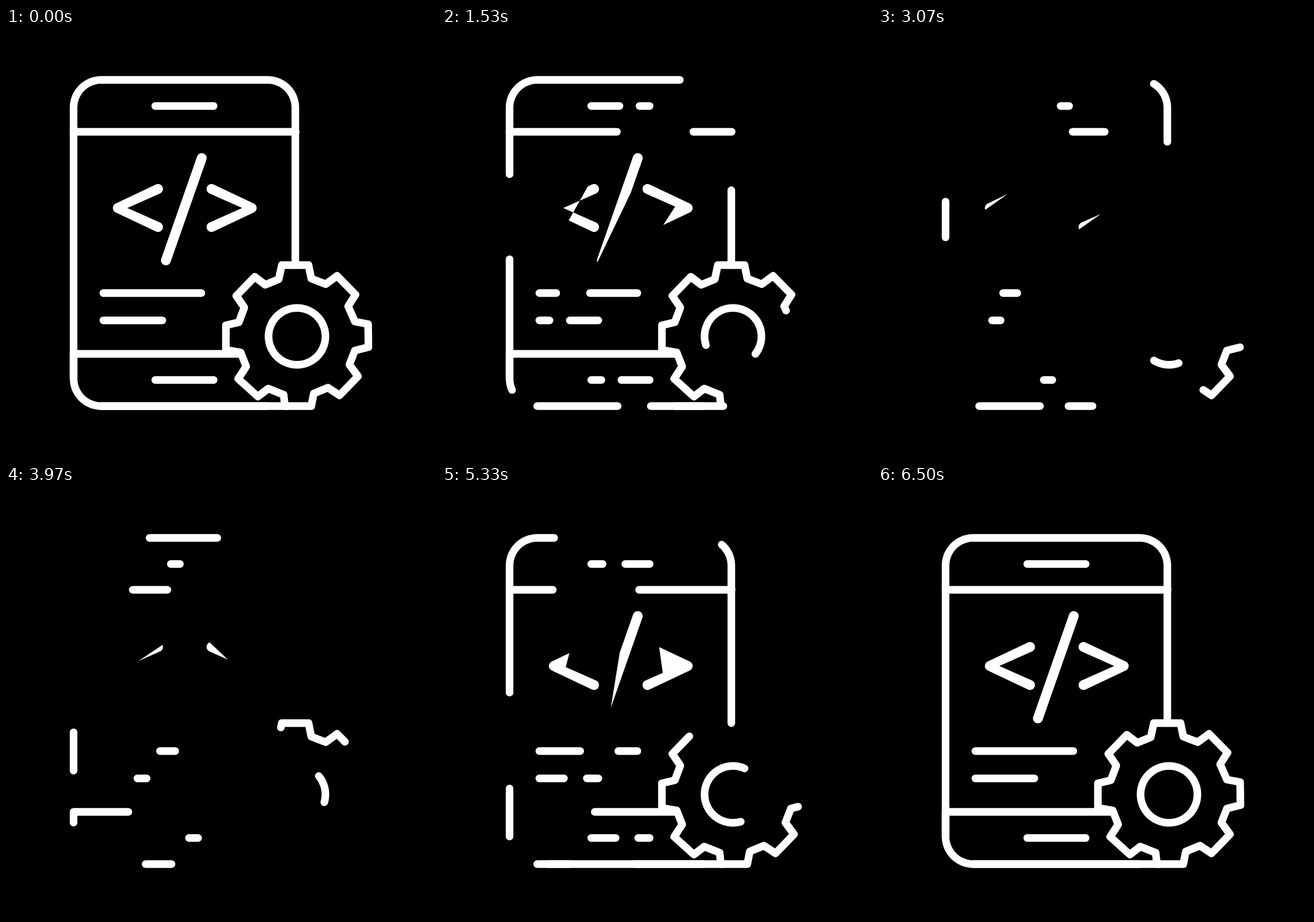
An HTML page with a canvas for the animation above (7.03 s loop, 700 by 700 pixels).

```html
<!DOCTYPE html>
<html lang="en">
<head>
<meta charset="utf-8">
<title>Mobile development icon</title>
<style>
  html, body { margin: 0; width: 100%; height: 100%; overflow: hidden; background: #000; }
  canvas { display: block; width: 700px; height: 700px; }
</style>
</head>
<body>
<canvas id="stage" width="700" height="700"></canvas>
<script>
const ctx = document.getElementById('stage').getContext('2d');
const LOOP = 7030, FIRST = 15, LAST = 195;
const EPS = 1e-6;

// Points along an arc, angles in degrees.
function arc(cx, cy, r, from, to) {
  const n = Math.max(4, Math.ceil(Math.abs(to - from) / 5));
  return Array.from({ length: n + 1 }, (_, i) => {
    const a = (from + (to - from) * i / n) * Math.PI / 180;
    return [cx + r * Math.cos(a), cy + r * Math.sin(a)];
  });
}

// A polyline with the running length at each point.
function makePath(pts, { closed = false, fill = false } = {}) {
  if (closed) pts = [...pts, pts[0]];
  const sums = [0];
  for (let i = 1; i < pts.length; i++) {
    sums.push(sums[i - 1] + Math.hypot(pts[i][0] - pts[i - 1][0], pts[i][1] - pts[i - 1][1]));
  }
  return { pts, sums, len: sums[sums.length - 1], closed, fill };
}

const line = (x1, x2, y) => makePath([[x1, y], [x2, y]]);
const glyph = (...parts) => makePath(parts.flat(), { closed: true, fill: true });

const gear = [
  [382, 528], [358, 524], [358, 484], [379, 479], [388, 455], [375, 436], [405, 405], [422, 418],
  [444, 409], [449, 386], [492.5, 386], [497, 408], [520.5, 417], [539, 403.5], [569, 434], [557, 453],
  [568, 478], [589.5, 482], [590, 519.5], [568, 525], [559, 548], [573, 567], [543, 598], [524, 585.5],
  [501, 595], [497, 615.5], [454, 615.5], [452, 597], [427, 587], [410, 600], [378, 571], [391, 551]
];

const paths = [
  // phone
  makePath([[110, 169], ...arc(155, 129.5, 45, 180, 270), ...arc(426, 129.5, 45, 270, 360), [471, 386]]),
  makePath([[110, 570.5], [110, 169]]),
  makePath([[382, 530.5], [110, 530.5], ...arc(155, 570.5, 45, 180, 90), [458, 615.5]]),
  line(155, 426, 615.5),
  line(110, 471.5, 169),
  line(243, 338, 127),
  line(338, 243, 573),
  line(318, 158.5, 431.5),
  line(254.5, 158.5, 476),
  // gear
  makePath(gear, { closed: true }),
  makePath(arc(473.7, 502, 46.3, 224, 584), { closed: true }),
  // code brackets and slash
  glyph(arc(247.5, 324, 8, 7, -64.7), [[197.5, 293]], arc(247.5, 262, 8, 64.7, -115.3),
    arc(182, 293, 8, 244.7, 115.3), arc(247.5, 324, 8, 115.3, 7)),
  glyph(arc(400, 293, 8, 0, -64.7), arc(334.5, 262, 8, -64.7, -244.7), [[384.5, 293]],
    arc(334.5, 324, 8, 244.7, 64.7), arc(400, 293, 8, 64.7, 0)),
  glyph(arc(318.7, 211.7, 8, -71, -161), arc(260.3, 378.3, 8, 199, 19), arc(318.7, 211.7, 8, 19, -71))
];

function pointAt({ pts, sums, len }, d) {
  if (d > len) d -= len;
  let i = 1;
  while (i < pts.length - 1 && sums[i] < d) i++;
  const k = (d - sums[i - 1]) / (sums[i] - sums[i - 1] || 1);
  const [a, b] = [pts[i - 1], pts[i]];
  return [a[0] + (b[0] - a[0]) * k, a[1] + (b[1] - a[1]) * k];
}

// Adds the part between two fractions; the end may pass 1 on closed paths.
function trace(path, from, to) {
  if (to - from < EPS) return;
  const a = from * path.len, b = to * path.len;
  const part = [pointAt(path, a)];
  for (const turn of [0, path.len]) {
    path.pts.forEach((pt, i) => {
      const d = path.sums[i] + turn;
      if (d > a + EPS && d < b - EPS) part.push(pt);
    });
  }
  part.push(pointAt(path, b));
  part.forEach(([x, y], i) => i ? ctx.lineTo(x, y) : ctx.moveTo(x, y));
  if (path.closed && to - from > 1 - EPS) ctx.closePath();
}

function drawPath(path, lo, hi) {
  ctx.beginPath();
  if (path.closed || hi <= 1 + EPS) {
    trace(path, lo, hi);
  } else {
    trace(path, lo, 1);
    trace(path, 0, hi - 1);
  }
  if (path.fill) ctx.fill(); else ctx.stroke();
}

// 30 frames a second, with start times rounded to 10 ms.
function frameAt(t) {
  const f = Math.floor((t + 5) * 0.03);
  return Math.round(f / 0.3) * 10 > t ? f - 1 : f;
}

function draw(t) {
  const p = Math.min(1, Math.max(0, (frameAt(t) - FIRST) / (LAST - FIRST)));
  const start = -p, end = 1 - 3 * p;
  let lo = Math.min(start, end), hi = Math.max(start, end);
  const turns = Math.floor(lo + EPS);
  lo = Math.max(0, lo - turns);
  hi -= turns;

  ctx.fillStyle = '#000';
  ctx.fillRect(0, 0, 700, 700);
  ctx.fillStyle = ctx.strokeStyle = '#fff';
  ctx.lineWidth = 12.4;
  ctx.lineCap = ctx.lineJoin = 'round';
  if (hi - lo > EPS) paths.forEach(path => drawPath(path, lo, hi));
}

let origin = null;
function tick(now) {
  if (origin === null) origin = now;
  draw((now - origin) % LOOP);
  requestAnimationFrame(tick);
}
draw(0);
requestAnimationFrame(tick);
</script>
</body>
</html>
```
